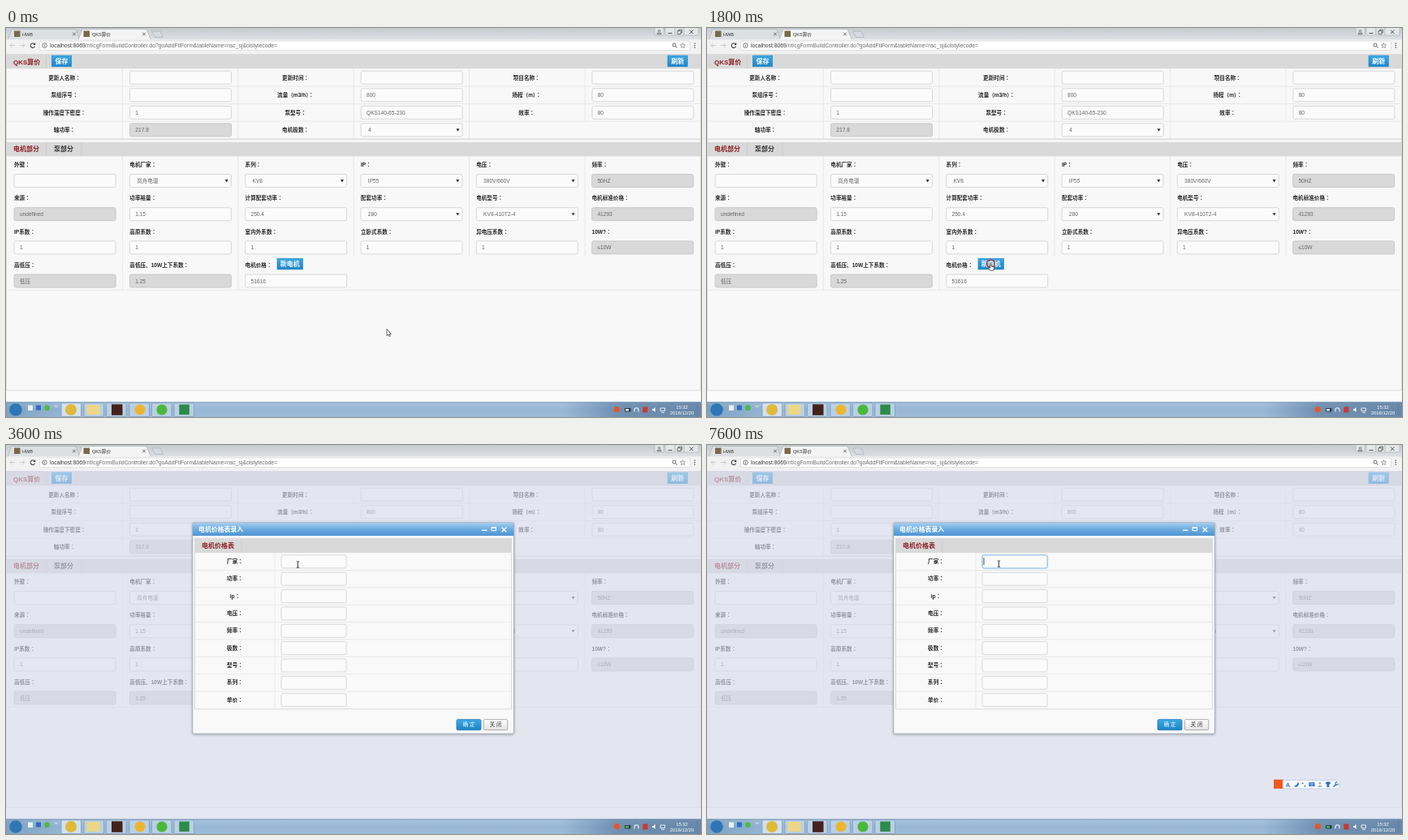
Animation of 856 by 480 pixels, one loop 8 s. Source, as an HTML page:

```html
<!DOCTYPE html>
<html lang="zh-CN">
<head>
<meta charset="utf-8">
<title>Pricing form</title>
<style>
html, body { margin: 0; width: 100%; height: 100%; overflow: hidden; background: #f8f8f8; }
svg { display: block; width: 100vw; height: 100vh; }
text { font-family: "Liberation Sans", "Noto Sans CJK SC", "Noto Sans CJK", sans-serif; white-space: pre; }
.colon { font-family: "Noto Sans CJK JP", "Noto Sans CJK", sans-serif; }
</style>
</head>
<body>
<script>
const LOOP = 8000, INK = '#262626', RED = '#8c1d22';

// ---- markup helpers ----
const rect = (x, y, w, h, fill, extra = '') =>
  `<rect x="${x}" y="${y}" width="${w}" height="${h}" fill="${fill}" ${extra}/>`;
const circle = (x, y, r, fill, extra = '') =>
  `<circle cx="${x}" cy="${y}" r="${r}" fill="${fill}" ${extra}/>`;
const path = (d, stroke, width = 1, fill = 'none') =>
  `<path d="${d}" fill="${fill}" stroke="${stroke}" stroke-width="${width}"/>`;
const text = (x, y, s, size = 6.6, fill = '#666', extra = '') =>
  `<text x="${x}" y="${y}" font-size="${size}" fill="${fill}" ${extra}>${s.replace(/&/g, '&amp;')}</text>`;
const bold = (x, y, s, size = 6.6, fill = INK, extra = '') =>
  text(x, y, s.replace('：', '<tspan class="colon" lang="ja">：</tspan>'), size, fill, 'font-weight="700" ' + extra);
const MID = 'text-anchor="middle"';
const group = (id, body, extra = '') => `<g id="${id}" ${extra}>${body}</g>`;
const grad = (id, ...stops) => `<linearGradient id="${id}" x2="0" y2="1">` +
  stops.map((c, i) => `<stop offset="${i / (stops.length - 1)}" stop-color="${c}"/>`).join('') + '</linearGradient>';

// kind: '' plain, 's' select, 'd' disabled
function field(x, y, w, value = '', kind = '') {
  const off = kind === 'd';
  let out = rect(x + .5, y + .5, w - 1, 16, off ? '#d9d9d9' : '#fbfbfb',
    `rx="2" stroke="${off ? '#c6c6c6' : '#d4d4d4'}" stroke-width=".9"`);
  if (value) out += text(x + (kind === 's' ? 9.3 : 7.3), y + 10.9, value);
  if (kind === 's') out += path(`M${x + w - 8.2} ${y + 7}h4l-2 3.4z`, 'none', 0, '#333');
  return out;
}

function blueButton(x, y, w, label) {
  return rect(x, y, w, 13.6, 'url(#blue)', 'stroke="#1f86c6" stroke-width=".6"') +
    bold(x + w / 2, y + 9.8, label, 8, '#fff', MID);
}

const bar = (x, y, w) => rect(x, y, w, 17.6, '#d9d9d9');

// ---- browser frame ----
function browser() {
  let s = rect(0, 0, 856, 15, 'url(#strip)');
  s += path('M2 14.5L7 1.5H86L91 14.5', '#a9b0b8', .7, '#dde0e3');
  s += path('M89 14.5L94 1.5H173L178.500 14.5', '#a9b0b8', .7, '#f4f4f4');
  s += path('M180 4h10l3.500 7.500h-10z', '#aab2ba', .7, '#d6dade');
  s += rect(10, 3.5, 7.5, 7.5, '#77694a') + text(20, 9.5, 'HWB', 5.6, '#333');
  s += group('tabIcon', rect(95.5, 3.5, 7.5, 7.5, '#77694a')) + text(106, 9.5, 'QKS算价', 5.6, '#333');
  for (const x of [84, 170]) s += path(`M${x - 1.8} 5.700l3.600 3.600m0-3.600l-3.600 3.600`, '#555', .9);
  for (const [x, w] of [[799, 11], [812, 12], [824, 11], [835, 18]])
    s += rect(x, -2, w, 11, '#e4e6e8', 'rx="1.500" stroke="#a5abb1" stroke-width=".6"');
  s += circle(804.5, 3.7, 1.3, 'none', 'stroke="#555" stroke-width=".8"') + path('M802 7.700h5v-1.500h-5z', '#555', .7);
  s += path('M815.500 6.500h5', '#555', 1.1) + path('M827 3.500h4v4h-4zM828.500 3.500v-1.500h4v4h-1.500', '#555', .8);
  s += path('M842 2.500l4.500 4.500m0-4.500l-4.500 4.500', '#555', 1);

  s += rect(0, 14.3, 856, 18, '#f2f2f2') + rect(41.5, 16, 801, 11.6, '#fff', 'rx="2" stroke="#d6d6d6" stroke-width=".7"');
  s += path('M11 21.500h-6m2.500-2.500l-2.500 2.500l2.500 2.500', '#c9c9c9', 1);
  s += path('M17 21.500h6m-2.500-2.500l2.500 2.500l-2.500 2.500', '#c9c9c9', 1);
  s += group('reload', path('M35.300 20A2.800 2.800 0 1 0 35.600 22.600', '#444', 1.1) + path('M36.200 18v3h-3z', 'none', 0, '#444'));
  s += group('stop', path('M30.500 19l5 5m0-5l-5 5', '#444', 1.1));
  s += circle(47.5, 21.6, 2.8, 'none', 'stroke="#555" stroke-width=".8"') + path('M47.500 21.200v2M47.500 19.700v.8', '#555', .8);
  s += text(54, 24.2, 'localhost:8069<tspan fill="#6a6a6a">/nf/cgFormBuildController.do?goAddFtlForm&tableName=nsc_sj&olstylecode=</tspan>', 6.81, '#333');
  s += circle(823, 21, 2, 'none', 'stroke="#555" stroke-width=".9"') + path('M824.500 22.500l2 2', '#555', 1);
  s += path('M833.500 18.500l.9 2.100 2.200.2-1.700 1.500.5 2.200-1.900-1.200-1.900 1.200.5-2.200-1.700-1.500 2.200-.2z', '#666', .6);
  for (const y of [19, 21.5, 24]) s += circle(848.3, y, .8, '#555');
  return s;
}

// ---- page ----
const colX = i => 10 + 142.3 * i;
const edgeX = i => 1 + 142.4 * i;

const SUMMARY = [
  [['更新人名称：'], ['更新时间：'], ['项目名称：']],
  [['泵组序号：'], ['流量（m3/h）：', '800'], ['扬程（m）：', '80']],
  [['操作温度下密度：', '1'], ['泵型号：', 'QKS140-65-230'], ['效率：', '80']],
  [['轴功率：', '217.8', 'd'], ['电机极数：', '4', 's']]
];
const MOTOR = [
  [['外键：'], ['电机厂家：', '岚舟电驱', 's'], ['系列：', 'KV8', 's'], ['IP：', 'IP55', 's'], ['电压：', '380V/660V', 's'], ['频率：', '50HZ', 'd']],
  [['来源：', 'undefined', 'd'], ['功率裕量：', '1.15'], ['计算配套功率：', '250.4'], ['配套功率：', '280', 's'], ['电机型号：', 'KV8-410T2-4', 's'], ['电机标准价格：', '41293', 'd']],
  [['IP系数：', '1'], ['高原系数：', '1'], ['室内外系数：', '1'], ['立卧式系数：', '1'], ['异电压系数：', '1'], ['10W?：', '≤10W', 'd']],
  [['高低压：', '低压', 'd'], ['高低压、10W上下系数：', '1.25', 'd'], ['电机价格：', '51616']]
];

function page() {
  const line = '#e5e5e5';
  let s = rect(0, 32, 856, 430, '#fbfbfb') + rect(.5, 32.5, 855, 414.7, '#f8f8f8', 'stroke="#dadada" stroke-width=".9"');
  s += bar(0, 32.6, 856) + path('M49.500 33v17', '#cbcbcb', .8) + bold(9, 44.7, 'QKS算价', 8, RED);
  s += blueButton(56.3, 34, 24.4, '保存') + blueButton(815, 34, 24.4, '刷新');

  SUMMARY.forEach((row, r) => {
    const y = 50.5 + 21.55 * r;
    s += path(`M0 ${y + 21.5}H856`, line, .8);
    row.forEach(([label, value, kind], c) => {
      s += bold(72 + 284.6 * c, y + 13.1, label, 6.6, INK, MID);
      s += field(152 + 284.7 * c, y + 2.2, 126, value, kind);
    });
  });
  for (let i = 1; i < 6; i++) {
    s += path(`M${edgeX(i)} 50.500V${i < 5 ? 137 : 115}`, line, .8);
    s += path(`M${edgeX(i)} 158V${i < 3 ? 323 : 282}`, line, .8);
  }
  s += path('M0 137.500H856', '#d4d4d4', .8);

  s += bar(0, 140.7, 856) + path('M49.500 141v17M93 141v17', '#cbcbcb', .8);
  s += bold(9, 152.4, '电机部分', 8, RED) + bold(59, 152.4, '泵部分', 8, '#333');
  MOTOR.forEach((row, r) => row.forEach(([label, value, kind], c) => {
    const y = 159 + 41.2 * r;
    s += bold(colX(c), y + 12.2, label) + field(colX(c) - .4, y + 21, 126, value, kind);
  }));
  s += path('M0 323.500H856', line, .8);
  return s + blueButton(334, 284.3, 31.6, '新电机');
}

// ---- dialog ----
const ROW = 21.35;
const LABELS = ['厂家：', '功率：', 'ip：', '电压：', '频率：', '极数：', '型号：', '系列：', '单价：'];

function form() {
  let s = rect(232.5, 115.2, 390, 210.6, '#f9f9f9', 'stroke="#d5d5d5" stroke-width=".9"');
  s += bar(233, 115.5, 389) + path('M290 116v17', '#cbcbcb', .8) + bold(241, 127.4, '电机价格表', 8, RED);
  LABELS.forEach((label, i) => {
    const y = 133.2 + ROW * i;
    if (i) s += path(`M233 ${y}H622`, '#e5e5e5', .8);
    s += bold(282, y + 12.8, label, 6.6, INK, MID) + field(338.6, y + 2.2, 81, '');
  });
  s += path('M331 133V325', '#e5e5e5', .8);
  s += group('focus', rect(339.1, 135.9, 80, 16, '#fbfbfb', 'rx="2" stroke="#86bdec" stroke-width=".9" filter="url(#glow)"'));
  return s + group('caret', path('M341 139.200v9', '#222', .8));
}

function dialog() {
  let s = rect(229.8, 95.8, 395.6, 258.4, '#f9f9f9', 'id="box" rx="1.500" stroke="#8b9aaa" stroke-width=".7" filter="url(#shadow)"');
  s += rect(230, 96, 395.2, 16, 'url(#title)') + bold(237, 106.5, '电机价格表录入', 7.9, '#fff');
  s += path('M586 105.200h6.500', '#fff', 1.3) + path('M598 101.700h5.500v4h-5.500z', '#fff', 1) + path('M598 102h5.500', '#fff', 1.5);
  s += path('M610.700 101.700l5.600 5.600m0-5.600l-5.600 5.600', '#fff', 1.3);
  let dots = '';
  for (let i = 0; i < 12; i++) {
    const a = i * Math.PI / 6;
    dots += circle(6.6 * Math.sin(a), -6.6 * Math.cos(a), 1.35, '#333', `opacity="${.18 + .068 * i}"`);
  }
  s += group('spinner', dots) + group('form', form());
  const foot = rect(555, 337, 30, 13, 'url(#blue)', 'rx="1.500" stroke="#1c77b5" stroke-width=".8"') +
    text(570, 345.8, '确 定', 6.4, '#fff', MID) +
    rect(588.3, 337, 29.5, 13, 'url(#grey)', 'rx="1.500" stroke="#999" stroke-width=".8"') +
    text(603, 345.8, '关 闭', 6.4, '#333', MID);
  return s + group('foot', foot);
}

// ---- desktop ----
function taskbar() {
  let s = rect(0, 461.5, 856, 18.5, 'url(#task)') + rect(0, 461.5, 856, 18.5, 'url(#ends)');
  s += path('M0 462H856', '#6f8fae', .8);
  s += circle(12, 471, 7.8, '#2f76b5');
  s += rect(27, 465.5, 6, 6.5, '#e9f0f5') + rect(37, 465.5, 6, 6, '#2f6fc0') + circle(50.5, 468.7, 3.4, '#4fb84a');
  s += path('M60 466l1.800 1.500L63.600 466', '#fff', .9);
  [68, 96, 123.5, 152, 179.500, 207].forEach((x, i) =>
    s += rect(x, 462.8, 24.5, 16.8, i ? '#c4d8ea' : '#e6eff7', `rx="1.500" opacity=".75" stroke="#6d8dac" stroke-width=".7"`));
  s += circle(80, 471, 7, '#e0b93a') + rect(99.5, 465, 16, 12, '#ecd687') + rect(130, 464.3, 13.5, 13.5, '#43221d');
  s += circle(165, 471, 6.5, '#edb52e') + circle(192, 471, 6.6, '#4bb83c') + rect(213.3, 464.6, 12.5, 12.5, '#2e8a4a');
  s += circle(752.3, 470.7, 3.6, '#e4572c');
  s += rect(762, 469, 7.5, 4.5, '#2e3a45', 'rx="1"') + rect(763, 470, 4, 2.5, '#dfe6ea', 'id="battery"');
  s += path('M774 473.500v-2a2.500 2.800 0 0 1 5 0v2', '#f4f4f4', 1.1) + rect(784.3, 467.5, 6, 7, '#c83a34');
  s += path('M796 470h1.500l2-2v6l-2-2H796z', 'none', 0, '#fff') + path('M806 469h5.500v3.500h-5.500zM807 474.500h4', '#f4f4f4', .9);
  s += text(832.5, 469.8, '15:32', 5.9, '#fff', MID) + text(832.5, 477.4, '2016/12/20', 5.9, '#fff', MID);
  return s + path('M851.500 462.500v17', '#5a7c9d', .7);
}

function imeBar() {
  const blue = '#2f6fc4';
  let s = rect(704, 413.5, 75, 10.5, '#fbfdff', 'rx="1.500" stroke="#b3cbe6" stroke-width=".8"');
  s += rect(698, 412.8, 11.2, 11.2, '#ee5a24') + bold(715.5, 421.6, 'A', 7.6, blue, MID);
  s += path('M727.800 415.800a3.200 3.200 0 1 1-5 4.800q4.200 0 5-4.800z', 'none', 0, blue);
  s += circle(733.5, 417.5, 1, blue) + path('M736.500 419.500q1 1.200-.8 2.300', blue, 1.1);
  s += rect(741.3, 416.3, 7.2, 5, blue, 'rx=".6"') + path('M742.500 418h5M743.500 420h3', '#fff', .7);
  s += circle(755, 417.3, 1.5, '#a8b4c2') + path('M751.800 422q3.200-4.500 6.400 0z', 'none', 0, '#a8b4c2');
  s += path('M761.500 417l2-1.500h2.800l2 1.500-1.200 1.600-.7-.4v4h-3v-4l-.7.4z', 'none', 0, blue);
  return s + path('M771.500 422l3.500-3.500', blue, 1.5) + path('M776.800 416.300a1.700 1.700 0 1 0 .6 1.600', blue, 1.2);
}

const cursors =
  group('arrow', path('M0 0V8.200L1.900 6.500 3.200 9.200 4.400 8.600 3.200 6.100H5.400z', '#222', .7, '#fff')) +
  group('hand', path('M-.8 0Q0-.8.7 0V3.200L3.600 3.900Q4.500 4.200 4.300 5.500L3.500 8.400H-.7L-3 5.200Q-2.600 4-.8 5.300z', '#222', .7, '#fff')) +
  group('beam', path('M-1.600-4Q0-4 0-3Q0-4 1.600-4M0-3.200V3.200M-1.600 4Q0 4 0 3Q0 4 1.600 4', '#222', .85));

const defs = `<defs>${grad('blue', '#3fa9e4', '#1c84c6')}${grad('grey', '#fff', '#e3e3e3')}
${grad('title', '#a5cdf0', '#6cabe0', '#4f94d1')}${grad('strip', '#c6cbd0', '#dfe2e5')}${grad('task', '#a9c4de', '#98b7d6', '#9dbcd9')}
<linearGradient id="ends" stop-color="#4f7398"><stop offset="0" stop-color="#4f7f9f" stop-opacity=".4"/><stop offset=".1" stop-color="#4f7f9f" stop-opacity="0"/>
<stop offset=".8" stop-color="#46678c" stop-opacity="0"/><stop offset=".88" stop-color="#46678c" stop-opacity=".5"/><stop offset="1" stop-color="#46678c" stop-opacity=".6"/></linearGradient>
<filter id="shadow" x="-5%" y="-5%" width="110%" height="112%"><feDropShadow dx="0" dy="1" stdDeviation="1.6" flood-color="#333" flood-opacity=".4"/></filter>
<filter id="glow" x="-10%" y="-40%" width="120%" height="180%"><feDropShadow dx="0" dy="0" stdDeviation="1" flood-color="#66afe9" flood-opacity=".4"/></filter></defs>`;

document.body.innerHTML = `<svg viewBox="0 0 856 480" preserveAspectRatio="none">` + defs + browser() +
  group('tabWait', path('M96.500 7a2.700 2.700 0 0 1 2.700-2.700', '#8a8a8a', .9)) + page() +
  group('modal', rect(0, 32.3, 856, 429.3, '#d7dbed', 'opacity=".62"') + dialog()) +
  group('ime', imeBar()) + taskbar() +
  circle(0, 0, 5, 'none', 'id="ring" stroke="#d8322b" stroke-width="1.300"') + group('pointer', cursors) + '</svg>';

// ---- motion ----
const $ = id => document.getElementById(id);
const show = (id, on) => $(id).setAttribute('display', on ? 'inline' : 'none');
const place = (id, v) => $(id).setAttribute('transform', v);

const OPEN = 1950, READY = 2400, LOADED = 2600, FOCUS = 4180, BLINK = 560;
const MOVES = [ // start, end, x, y
  [0, 0, 469, 371.5],
  [120, 1150, 349.5, 290.8],
  [2420, 2980, 359.5, 147.6],
  [3700, 3790, 359.5, 146.7]
];
const CLICKS = [[1380, 1950], [3900, 4380]];

function pointerAt(t) {
  let [, , x, y] = MOVES[0];
  for (const [a, b, tx, ty] of MOVES.slice(1)) {
    const k = Math.min(1, Math.max(0, (t - a) / (b - a))), e = k * k * (3 - 2 * k);
    x += (tx - x) * e;
    y += (ty - y) * e;
  }
  return [x, y];
}

function shapeAt(t, x, y) {
  const inside = (l, top, r, b) => x > l && x < r && y > top && y < b;
  if (t < OPEN) {
    if (inside(334, 284, 366, 298)) return 'hand';
    return inside(294, 303, 420, 320) ? 'beam' : 'arrow';
  }
  const overField = inside(339, 135, 419, 323) && (y - 135.4) % ROW < 16.5;
  return t >= READY && overField ? 'beam' : 'arrow';
}

function draw(t) {
  const [x, y] = pointerAt(t), shape = shapeAt(t, x, y);
  place('pointer', `translate(${x} ${y})`);
  for (const c of ['arrow', 'hand', 'beam']) show(c, c === shape);

  const click = CLICKS.find(([a, b]) => t >= a && t < b);
  show('ring', click);
  if (click) {
    place('ring', `translate(${x} ${y})`);
    $('ring').setAttribute('r', 2.5 + 3.2 * (t - click[0]) / (click[1] - click[0]));
  }

  const open = t >= OPEN, ready = t >= READY, busy = open && t < LOADED;
  const turn = Math.floor(t / 80) % 12 * 30;
  show('modal', open);
  show('spinner', !ready);
  place('spinner', `translate(427.700 223.700) rotate(${turn + 30})`);
  show('form', ready);
  $('box').setAttribute('height', ready ? 260.4 : 258.4);
  place('foot', `translate(0 ${ready ? 1.7 : 0})`);
  show('tabIcon', !busy);
  show('tabWait', busy);
  place('tabWait', `rotate(${turn} 99.200 7)`);
  show('reload', !busy);
  show('stop', busy);
  $('battery').setAttribute('fill', t >= LOADED ? '#43c04a' : '#dfe6ea');

  show('focus', t >= FOCUS);
  show('caret', t >= FOCUS && Math.floor((t - FOCUS) / BLINK) % 2 === 0);
  show('ime', t >= 4350);
}

const start = performance.now();
function tick() {
  draw((performance.now() - start) % LOOP);
  requestAnimationFrame(tick);
}
tick();
</script>
</body>
</html>
```
